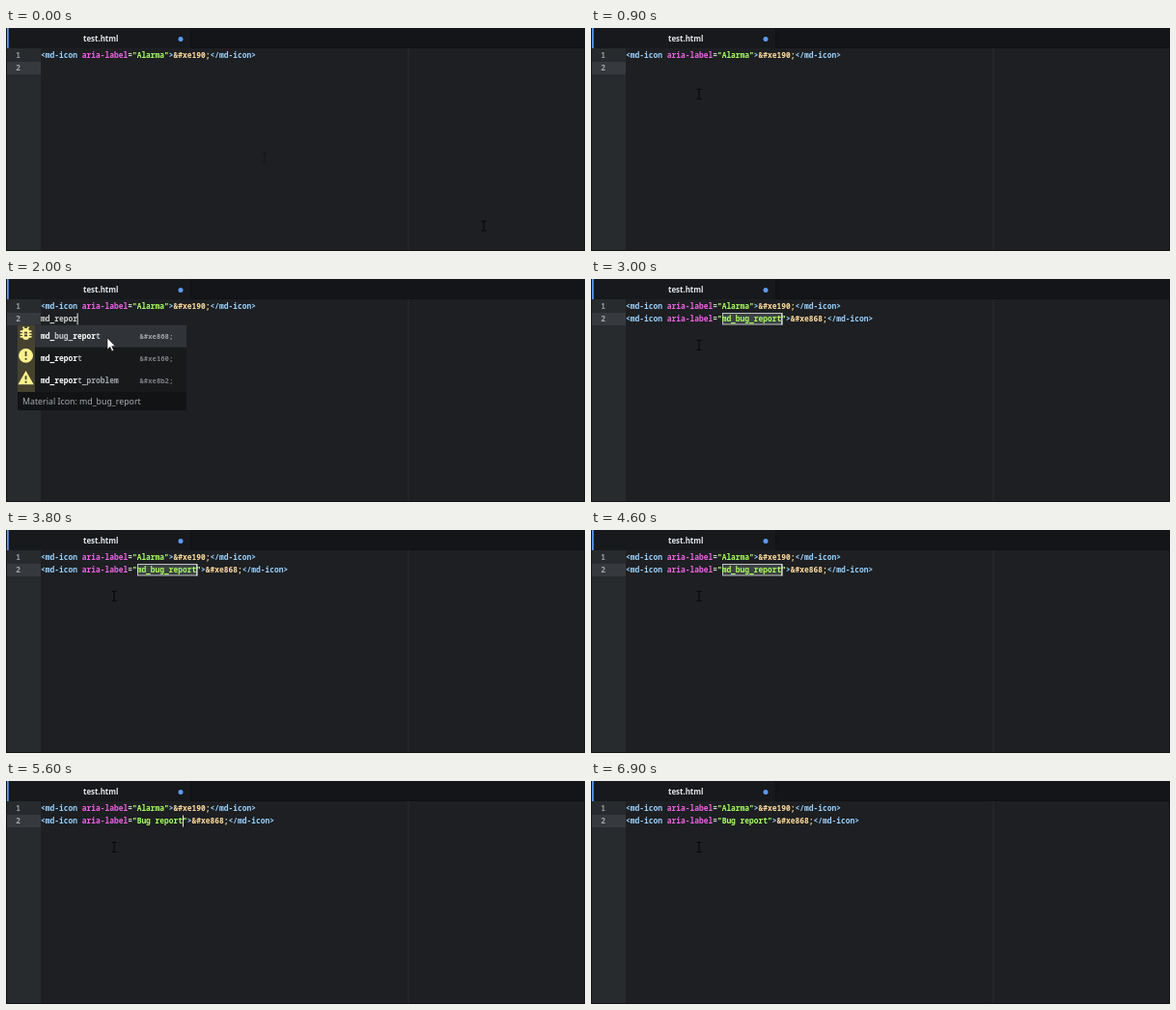
These frames come from a looping animation (600 px wide and 231 px high, 7100 ms). An HTML page:

```html
<!DOCTYPE html>
<html lang="en">
<head>
<meta charset="utf-8">
<title>Icon autocomplete</title>
<style>
html, body { margin: 0; width: 100%; height: 100%; overflow: hidden; background: #1d1f22; }
svg { display: block; width: 600px; height: 231px; }
text { white-space: pre; }
.mono { font: 650 7.92px "Noto Sans Mono", monospace; }
.ui { font: 600 7.9px "Noto Sans", sans-serif; fill: #e2e5ea; }
.note { font: 8.8px "Noto Sans", sans-serif; fill: #a9acb0; }
.num { fill: #969a9f; }
.num.on { fill: #a4a8ac; }
.tag { fill: #9ad2ff; }
.attr { fill: #ee62e2; }
.eq { fill: #d0d3d1; }
.str { fill: #a8ff60; }
.ent { fill: #ffdc9e; }
.name { fill: #a3a6aa; }
.name.on { fill: #c6c9cd; }
.hit { fill: #fff; font-weight: 800; }
.code { font-size: 7.25px; fill: #7c7f83; }
.code.on { fill: #a2a5a9; }
.icon { fill: none; stroke: #fbf18e; stroke-width: 2.4; }
.icon .solid { fill: #fbf18e; stroke: none; }
.icon .cut { stroke: #45432f; }
</style>
</head>
<body>
<svg viewBox="0 0 600 231">
  <rect width="600" height="231" fill="#1d1f22"/>
  <rect width="192" height="21" fill="#17191c"/>
  <rect x="192" width="408" height="21" fill="#131518"/>
  <path d="M192 20.5H600M191.500 0V21" stroke="#101113"/>
  <rect x="1" width="1.8" height="21" fill="#5a96f0"/>
  <rect x="1" y="21" width="35" height="210" fill="#282b2e"/>
  <rect x="1" y="35" width="35" height="13" fill="#36393d"/>
  <path d="M417 21V231" stroke="#2a2c2f"/>
  <path d="M.5 0V231M599.5 0V230.5H0" fill="none" stroke="#131314"/>
  <text class="ui" x="80" y="14.2">test.html</text>
  <circle cx="181" cy="11.4" r="2.5" fill="#5c9af6"/>
  <text class="mono num" x="10.3" y="31">1</text>
  <text class="mono num on" x="10.3" y="44">2</text>
  <g id="view"></g>
</svg>
<script>
const LOOP = 7100, STEP = 100, CHAR = 4.755, LEFT = 36, ROW = 23.1, TOP = 47.7;
const view = document.getElementById('view');

const CLOCK = '<circle cx="12" cy="12.5" r="8.5"/><path d="M12 7V13L16 15.5"/>';
const ALARM = CLOCK + '<path d="M2 6L7 2M22 6L17 2"/>';
const LOOP_ARROW = '<path d="M18 7A8 8 0 1 0 20 14"/><path class="solid" d="M21 3V11H13Z"/>';
const ICONS = {
  rotation: '<path d="M1 11A11 11 0 0 1 18 2.500M23 13A11 11 0 0 1 6 21.500"/>' +
    '<path d="M5.500 8H10V16H5.500M6.500 12H10M13 8V16C21 17 21 7 13 8" stroke-width="2"/>',
  snow: [0, 60, 120].map(a =>
    `<path transform="rotate(${a} 12 12)" d="M12 1V23M8.500 3L12 6.500L15.500 3M8.500 21L12 17.500L15.500 21" stroke-width="2"/>`).join(''),
  alarm: ALARM,
  clock: CLOCK,
  person: '<path class="solid" d="M3 7H21V9.200H15V22H13V16H11V22H9V9.200H3Z"/><circle class="solid" cx="12" cy="4" r="2.300"/>',
  chair: '<circle class="solid" cx="11" cy="4" r="2.300"/><path d="M11 7V15H17V21M11 10Q14 13 18 13M9 12A5 5 0 1 0 15 19"/>',
  bank: '<path class="solid" d="M2 8L12 2L22 8V10H2ZM2 19H22V22H2ZM4 12H7V18H4ZM10.500 12H13.500V18H10.500ZM17 12H20V18H17Z"/>',
  bug: '<rect class="solid" x="7" y="5" width="10" height="16" rx="5"/><path d="M4 9H20M4 13H20M4 17H20M8 3L10 6M16 3L14 6"/>' +
    '<path class="cut" d="M10 11H14M10 15H14"/>',
  report: '<circle class="solid" cx="12" cy="12" r="10"/><path class="cut" d="M12 6V13M12 15.500V18"/>',
  warn: '<path class="solid" d="M12 2L23 21H1Z"/><path class="cut" d="M12 9V14.500M12 16.500V19"/>',
  refresh: LOOP_ARROW,
  replay: `<g transform="matrix(-1 0 0 1 24 0)">${LOOP_ARROW}</g>`,
  minus: '<path d="M5 12H19"/>',
  bars: '<path d="M4 6H20M4 10H20M4 14H20M4 18H20"/>',
  repeat: '<path d="M5 11V6H18M19 13V18H6"/><path class="solid" d="M17 2L21 6L17 10ZM7 14L3 18L7 22Z"/>',
  reply: '<path class="solid" d="M10 5V9Q19 10 21 20Q17 15 10 15V19L3 12Z"/>'
};

const row = s => s.split(' ');
const ALL = [
  '3d_rotation e84d rotation', 'ac_unit eb3b snow', 'access_alarm e190 alarm',
  'access_alarms e191 alarm', 'access_time e192 clock', 'accessibility e84e person',
  'accessible e914 chair', 'account_balance e84f bank'].map(row);
const RE = [
  'refresh e5d5 refresh', 'remove e15b minus', 'reorder e8fe bars', 'repeat e040 repeat',
  'replay e042 replay', 'reply e15e reply', 'report e160 report', 'report_problem e8b2 warn'].map(row);
const REPO = [row('bug_report e868 bug'), ...RE.slice(6)];
const TAGS = ['main', 'map', 'mark', 'menu', 'meta', 'meter'];

// Typing schedule: [start, interval, text]
const PREFIX = [[1100, 200, 'md_'], [1600, 100, 'repor'], [2300, 100, 't']];
const LABEL = [4700, 100, 'Bug report'];
const CARET_OFF = [[0, 400], [800, 1100], [2700, 2900], [3500, 3800], [4200, 4600], [6100, 6500], [6900, 7100]];

const esc = s => s.replace(/&/g, '&amp;').replace(/</g, '&lt;');
const span = (cls, s) => `<tspan class="${cls}">${esc(s)}</tspan>`;
const text = (x, y, cls, body) => `<text x="${x}" y="${y}" class="${cls}">${body}</text>`;
const rect = (x, y, w, h, fill) => `<rect x="${x}" y="${y}" width="${w}" height="${h}" fill="${fill}"/>`;
const typed = (t, [start, gap, s]) =>
  t < start ? '' : s.slice(0, Math.floor((t - start) / gap) + 1);

function markup(y, label, code) {
  return text(LEFT, y, 'mono', span('tag', '<md-icon ') + span('attr', 'aria-label') +
    span('eq', '=') + span('str', `"${label}"`) + span('tag', '>') +
    span('ent', `&#x${code};`) + span('tag', '</md-icon>'));
}

function panel(rows, width, note) {
  const end = TOP + rows * ROW;
  return rect(12, TOP, width, rows * ROW + (note ? 19 : 0), '#17191b') +
    rect(12, TOP, width, ROW, '#303338') +
    (note ? rect(12, end, width, 19, '#111315') + text(17, end + 12.8, 'note', note) : '');
}

function suggestions(rest) {
  if (!rest) return ALL;
  if (rest.length < 3) return RE;
  return rest.length < 4 ? RE.slice(3) : REPO;
}

function popup(rest) {
  const list = suggestions(rest), wide = list !== REPO, width = wide ? 203 : 175;
  let out = panel(list.length, width, wide ? '' : 'Material Icon: md_bug_report');
  out += rect(12, TOP, 18, list.length * ROW, '#45432f');
  list.forEach(([name, code, icon], i) => {
    const y = TOP + i * ROW, on = i ? '' : ' on', at = name.indexOf(rest);
    out += `<g class="icon" transform="translate(11.700 ${y - 0.3}) scale(.74)">${ICONS[icon]}</g>`;
    out += text(LEFT, y + 14.3, 'mono name' + on, span('hit', 'md_') + name.slice(0, at) +
      span('hit', rest) + name.slice(at + rest.length));
    out += text(width - 36.5, y + 14.2, 'mono code' + on, esc(`&#x${code};`));
  });
  return out + (wide ? rect(211, 49, 3, 158, '#53565a') : '');
}

const tagPopup = () => panel(TAGS.length, 175, 'Snippet: main') + TAGS.map((s, i) =>
  text(LEFT, TOP + i * ROW + 14.3, 'mono name', span('hit', 'm') + s.slice(1))).join('');

const beam = (x, y, alpha = 1) =>
  `<path transform="translate(${x} ${y})" opacity="${alpha}" fill="none" stroke="#050506"
    d="M-2.500 -5H-.5L0 -4.500L.5 -5H2.500M0 -4.500V4.500M-2.500 5H-.5L0 4.500L.5 5H2.500"/>`;
const ARROW = '<path d="M105 61V73L107.800 70.400L109.800 74.800L111.700 74L109.700 69.700H113.300Z" fill="#fff" stroke="#111" stroke-width=".6"/>';

// Quadratic sweep from the lower right to the resting place
function mouse(t) {
  const p = Math.min(t / 800, 1), u = p * p * (3 - 2 * p);
  const curve = (a, b, c) => (1 - u) * (1 - u) * a + 2 * u * (1 - u) * b + u * u * c;
  return beam(curve(495, 309, 112), curve(205, 160, 68.5)) + (t < STEP ? beam(268, 134, 0.35) : '');
}

function render(t) {
  let out = markup(31, 'Alarma', 'e190'), column, list = '';
  if (t < 2900) {
    const word = PREFIX.map(p => typed(t, p)).join('');
    out += text(LEFT, 44, 'mono eq', word);
    column = word.length;
    if (column >= 3) list = popup(word.slice(3));
    else if (column === 1) list = tagPopup();
  } else {
    const fresh = typed(t, LABEL), label = fresh || 'md_bug_report';
    if (!fresh) out += '<rect x="136.500" y="35.500" width="61.500" height="11.500" fill="#3e4245" stroke="#bfc3c5"/>';
    out += markup(44, label, 'e868');
    column = 21 + label.length;
  }
  if (!CARET_OFF.some(([a, b]) => t >= a && t < b))
    out += rect(LEFT + column * CHAR - 0.4, 35.5, 1, 12, '#e4e6e8');
  return out + list + (list ? ARROW : mouse(t));
}

let last = -1;
function tick() {
  const t = Math.floor(performance.now() % LOOP / STEP) * STEP;
  if (t !== last) view.innerHTML = render(last = t);
  requestAnimationFrame(tick);
}
tick();
</script>
</body>
</html>
```
